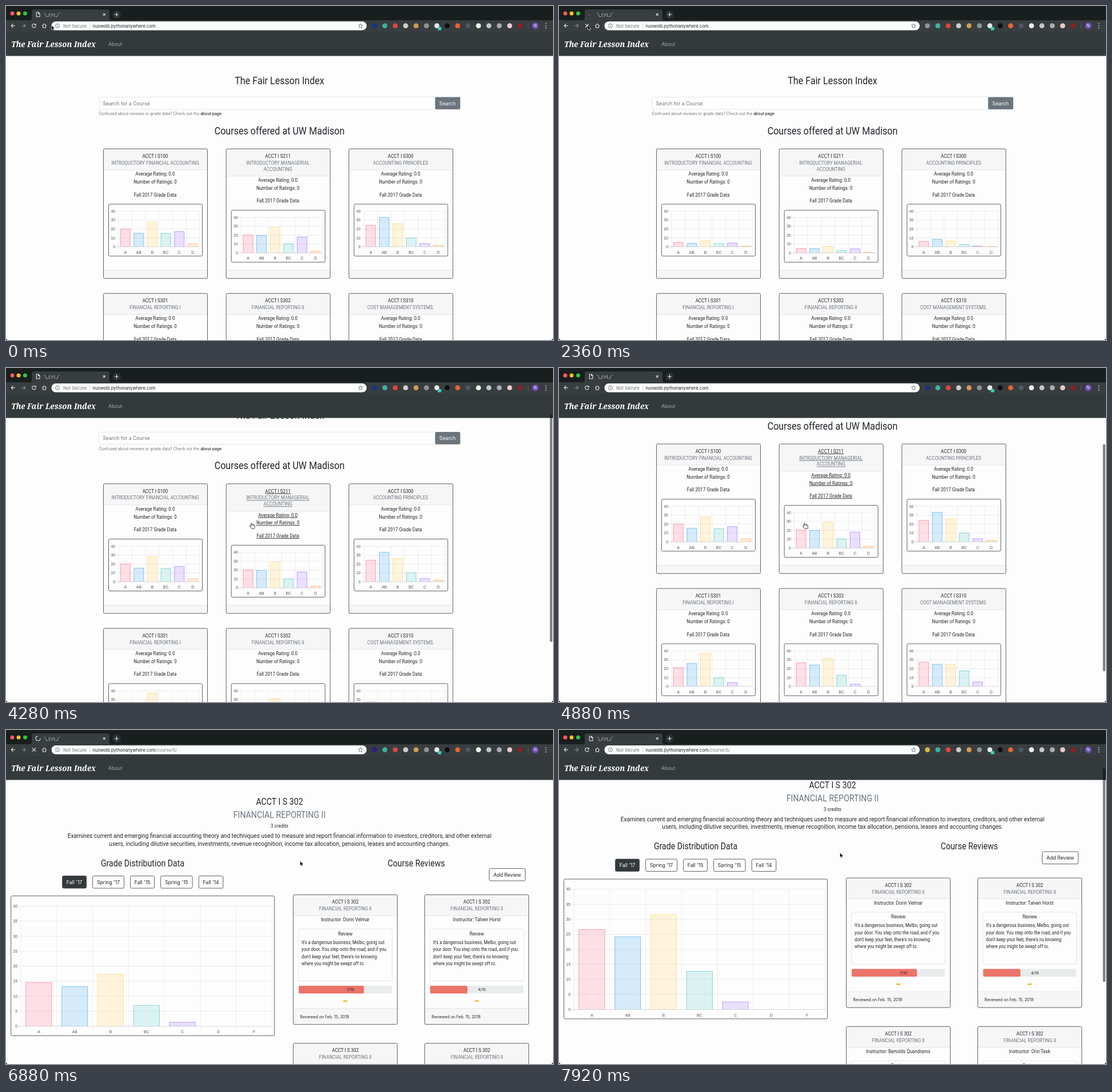
Write an HTML page that moves like this. It is 957x585 px and loops after 8000 ms.

```html
<!DOCTYPE html>
<html lang="en">
<head>
<meta charset="utf-8">
<title>Course guide</title>
<style>
  html, body { margin: 0; width: 100%; height: 100%; overflow: hidden; background: #fdfdfe; }
  svg { display: block; width: 100%; height: 100%; cursor: default; }
  text { font-family: Inter, 'Noto Sans CJK JP', 'Noto Sans', sans-serif; fill: #212529; white-space: pre; }
  .cond { font-family: Roboto, sans-serif; }
  .axis { font-family: 'Liberation Sans', sans-serif; font-size: 6.8px; fill: #555; }
  .brand { font-family: 'Noto Serif', serif; font-weight: 700; font-style: italic; fill: #fff; }
  .muted { fill: #6c757d; }
  .hover .link { text-decoration: underline; }
  .box { fill: none; stroke: #343a3c; stroke-width: .8; }
  .soft { fill: none; stroke: #d9dcdf; stroke-width: .7; }
  .band { fill: #f6f6f7; }
  .grid { fill: none; stroke: #000; stroke-opacity: .11; stroke-width: .6; }
  .zero { fill: none; stroke: #000; stroke-opacity: .25; stroke-width: .6; }
  .bars path { fill-opacity: .2; stroke-opacity: .85; stroke-width: .7; vector-effect: non-scaling-stroke; }
  .icon { fill: none; stroke: #e8eaeb; stroke-width: 1.1; }
</style>
</head>
<body>
<svg viewBox="0 0 957 585" xmlns="http://www.w3.org/2000/svg">
  <rect width="957" height="585" fill="#fdfdfe"/>
  <g id="home"></g>
  <g id="course"></g>

  <rect y="45" width="957" height="42.5" fill="#343a3c"/>
  <text class="brand" transform="translate(9 72) scale(.885 1)" font-size="15">The Fair Lesson Index</text>
  <text x="179" y="70" font-size="8.7" style="fill:#a3a7a9">About</text>

  <rect width="957" height="26" fill="#191e1e"/>
  <rect y="25" width="957" height="20" fill="#383d3f"/>
  <path d="M41 25.5Q45 25 45 21V10Q45 6 49 6H177Q181 6 181 10V21Q181 25 185 25.5Z" fill="#383d3f"/>
  <circle cx="11" cy="13" r="3.5" fill="#fb5d57"/>
  <circle cx="22" cy="13" r="3.5" fill="#fcbc2f"/>
  <circle cx="33.5" cy="13" r="3.5" fill="#2bc840"/>
  <path id="favicon" class="icon" d="M53.3 11h3.5l2.2 2.2v5.6h-5.7zM56.6 11v2.4h2.4" stroke-width=".9"/>
  <path id="spinner" class="icon"/>
  <text x="65" y="17.5" font-size="7" style="fill:#f2f3f3">¯\_(ツ)_/¯</text>
  <path class="icon" d="M169.8 12.8l4 4m0-4l-4 4"/>
  <circle cx="193.5" cy="15" r="7.5" fill="#2a3030"/>
  <path class="icon" d="M190 15h7M193.5 11.5v7"/>
  <path class="icon" d="M16 34.5H9.3M12.5 31.2L9.2 34.5l3.3 3.3"/>
  <path class="icon" d="M27 34.5h6.7M30.5 31.2l3.3 3.3-3.3 3.3" stroke-opacity=".45"/>
  <g id="reload"><path class="icon" d="M51.6 32.5a3.3 3.3 0 1 0 .6 2.8"/><path d="M52.6 30.8v3.3h-3.3z" fill="#e8eaeb"/></g>
  <path id="stop" class="icon" d="M45.9 31.4l6.2 6.2m0-6.2l-6.2 6.2"/>
  <path class="icon" d="M63.3 34.6L67 31.2l3.7 3.4M64.6 34.2v3.8h4.8v-3.8"/>
  <rect x="79.5" y="27" width="551.5" height="15.6" rx="7.8" fill="#fcfdfd"/>
  <circle cx="90" cy="34.7" r="3.5" fill="none" stroke="#5f6568" stroke-width=".8"/>
  <path d="M90 34.2v2.4M90 32.5v.9" stroke="#5f6568" stroke-width=".9"/>
  <text x="100" y="37.5" font-size="7.7" style="fill:#6b7073">Not Secure</text>
  <path d="M146.5 30v9.5" stroke="#c8cbcd" stroke-width=".7"/>
  <text x="151.5" y="37.5" font-size="7.6">nuswolb.pythonanywhere.com<tspan id="path" fill="#777c80">/course/5/</tspan></text>
  <path d="M620.3 30.8l1.1 2.6 2.8.2-2.1 1.8.6 2.8-2.4-1.5-2.4 1.5.6-2.8-2.1-1.8 2.8-.2z" fill="none" stroke="#5f6568" stroke-width=".8"/>
  <g id="extensions"></g>
  <path d="M913.5 30v9.5" stroke="#6a6f72" stroke-width=".7"/>
  <circle cx="926" cy="34.7" r="6" fill="#6a4bb0"/>
  <text x="926" y="37.3" font-size="7" text-anchor="middle" style="fill:#fff">N</text>
  <path d="M944.5 30.8v.01M944.5 34.6v.01M944.5 38.4v.01" stroke="#e8eaeb" stroke-width="1.8" stroke-linecap="round"/>

  <rect id="thumb" x="951.6" width="4.2" rx="2.1" fill="#000" fill-opacity=".5"/>
  <path d="M0 581v4h4Q0 585 0 581M957 581v4h-4Q957 585 957 581"/>
  <path id="arrow" d="M0 0V8.2L1.9 6.5 3.2 9.3 4.6 8.7 3.4 6H6Z" fill="#000" stroke="#fff" stroke-width=".6"/>
  <path id="hand" d="M0 .8Q.9-.4 1.8.8V3.6Q3.3 2.8 3.7 4 5-.2 5.4 4.4 7 3.8 7 5.4V7Q6.8 8.6 6 9.8H1.4Q-.8 7.4-2.2 5.6-2.2 4.4 0 5.6Z" fill="#fff" stroke="#111" stroke-width=".8"/>
</svg>

<script>
const LOOP = 8000;
const CONDENSED = 0.885;
const LABELS = ['A', 'AB', 'B', 'BC', 'C', 'D', 'F'];
const COLORS = ['#ff6384', '#36a2eb', '#ffce56', '#4bc0c0', '#9966ff', '#ff9f40', '#ff6384'];
const $ = id => document.getElementById(id);

// Drawing helpers: each returns SVG markup
const rect = (x, y, w, h, attrs) => `<rect x="${x}" y="${y}" width="${w}" height="${h}" ${attrs}/>`;
const line = (d, cls) => `<path class="${cls}" d="${d}"/>`;
const text = (x, y, size, str, attrs = '') => `<text x="${x}" y="${y}" font-size="${size}" ${attrs}>${str}</text>`;
const cond = (x, y, size, str, cls = '', anchor = 'middle') =>
  `<text class="cond ${cls}" transform="translate(${x} ${y}) scale(${CONDENSED} 1)" font-size="${size}" text-anchor="${anchor}">${str}</text>`;

function chart(x0, y0, unit, cat, tick, data) {
  const right = x0 + cat * data.length, barW = cat * 0.72;
  let grid = '', out = '', bars = '';
  for (let v = 0; v <= 40; v += tick) {
    const y = y0 - v * unit;
    if (v) grid += `M${x0 - 5} ${y}H${right}`;
    out += text(x0 - 6, y + 2.4, 6.8, v, 'class="axis" text-anchor="end"');
  }
  for (let i = 0; i <= data.length; i++) grid += `M${x0 + i * cat} ${y0 - 40 * unit}V${y0 + 5}`;
  data.forEach((v, i) => {
    const mid = x0 + (i + 0.5) * cat;
    out += text(mid, y0 + 12, 6.8, LABELS[i], 'class="axis" text-anchor="middle"');
    if (v) bars += `<path d="M${mid - barW / 2} 0V${-v * unit}h${barW}V0" fill="${COLORS[i]}" stroke="${COLORS[i]}"/>`;
  });
  return line(grid, 'grid') + line(`M${x0 - 5} ${y0}H${right}`, 'zero') + out +
    `<g class="bars" data-y="${y0}">${bars}</g>`;
}

function frame(headH, footY) {
  return rect(0, 0, 182, headH, 'class="band"') + rect(0, footY, 182, 227 - footY, 'class="band"') +
    line(`M0 ${headH}H182M0 ${footY}H182`, 'soft') + rect(0, 0, 182, 227, 'rx="2.3" class="box"');
}

const CARDS = [
  ['S100', ['INTRODUCTORY FINANCIAL ACCOUNTING'], [20, 15.3, 28, 15, 17.2, 3.2]],
  ['S211', ['INTRODUCTORY MANAGERIAL', 'ACCOUNTING'], [20.2, 19.8, 29, 10.3, 18, 2]],
  ['S300', ['ACCOUNTING PRINCIPLES'], [24.2, 33.2, 26, 10, 3.6, 1.7]],
  ['S301', ['FINANCIAL REPORTING I'], [21.2, 25.8, 37.3, 9.8, 4.4, 0]],
  ['S302', ['FINANCIAL REPORTING II'], [26.6, 24.2, 31.6, 12.7, 2.5, 0]],
  ['S310', ['COST MANAGEMENT SYSTEMS.'], [27.5, 25, 25, 17.6, 5.1, 0]],
].map(([code, title, grades], i) => ({
  code, title, grades, x: 170.5 + 214.7 * (i % 3), y: 250.2 + 253.2 * Math.floor(i / 3),
}));

function courseCard({ code, title, grades, x, y }) {
  const dy = (title.length - 1) * 10.8, mid = 90.5;
  return `<g class="card" transform="translate(${x} ${y})">` + frame(37 + dy, 212.5) +
    cond(mid, 15.8, 9.1, 'ACCT I ' + code, 'link') +
    title.map((s, i) => cond(mid, 27.6 + i * 10.8, 9.1, s, 'link muted')).join('') +
    ['Average Rating: 0.0', 'Number of Ratings: 0', 'Fall 2017 Grade Data']
      .map((s, i) => cond(mid, [47, 60.7, 83.3][i] + dy, 9.1, s, 'link')).join('') +
    rect(9, 96.8 + dy, 164, 91, 'rx="2.3" class="box"') +
    chart(26.5, 171.5 + dy, 1.553, 23.6, 10, grades) + '</g>';
}

const QUOTE = ['It\'s a dangerous business, Melbo, going out', 'your door. You step onto the road, and if you',
  'don\'t keep your feet, there\'s no knowing', 'where you might be swept off to.'];

function reviewCard([name, score], i) {
  const mid = 91;
  return `<g transform="translate(${502.6 + 230 * (i % 2)} ${288.6 + 260.2 * Math.floor(i / 2)})">` + frame(36.5, 199) +
    cond(mid, 15.5, 9.1, 'ACCT I S 302') + cond(mid, 27.5, 9.1, 'FINANCIAL REPORTING II', 'muted') +
    cond(mid, 46.8, 9.1, 'Instructor: ' + name) +
    rect(9, 60, 164, 91, 'rx="2" class="soft"') + cond(mid, 71.2, 9.1, 'Review') +
    QUOTE.map((s, j) => cond(14.5, 86 + 12.45 * j, 8.6, s, '', 'start')).join('') +
    rect(9.5, 159.5, 163, 13.5, 'rx="2" fill="#e9ecec"') +
    rect(9.5, 159.5, 16.3 * score, 13.5, 'rx="2" fill="#ec7368"') +
    text(100, 168.8, 6.8, score + '/10', 'text-anchor="middle"') +
    rect(87, 184.7, 8, 3, 'rx="1.5" fill="#f2c144"') +
    text(12, 216.2, 6.9, 'Reviewed on Feb. 15, 2018') + '</g>';
}

const button = (x, y, w, label, on) =>
  rect(x, y, w, 21.5, `rx="2.3" class="box" ${on ? 'style="fill:#343a3c"' : ''}`) +
  text(x + w / 2, y + 13.9, 8.7, label, `text-anchor="middle" ${on ? 'style="fill:#fff"' : ''}`);

$('home').innerHTML =
  cond(478.5, 136.6, 18.2, 'The Fair Lesson Index') +
  rect(162.5, 159.6, 589, 21.4, 'rx="2" class="soft"') +
  text(169.5, 173.5, 8.7, 'Search for a Course', 'class="muted"') +
  rect(750.7, 159.4, 44, 21.7, 'rx="2" fill="#6c757d"') +
  text(772.5, 173.5, 8.7, 'Search', 'text-anchor="middle" style="fill:#fff"') +
  text(162.3, 191.2, 6.9, 'Confused about reviews or grade data? Check out the <tspan fill="#000">about page</tspan>', 'class="muted"') +
  cond(478.5, 224.8, 18.2, 'Courses offered at UW Madison') +
  CARDS.map(courseCard).join('') +
  line('M432.5 762V740H523.5V762M451.5 740v22M470.5 740v22M490.5 740v22', 'soft');

$('course').innerHTML =
  cond(478.5, 131.2, 16, 'ACCT I S 302') + cond(478.5, 154.3, 16, 'FINANCIAL REPORTING II', 'muted') +
  cond(478.5, 171.4, 9.1, '3 credits') +
  cond(478.5, 189, 11.4, 'Examines current and emerging financial accounting theory and techniques used to measure and report financial information to investors, creditors, and other external') +
  cond(478.5, 202.7, 11.4, 'users, including dilutive securities, investments, revenue recognition, income tax allocation, pensions, leases and accounting changes.') +
  cond(239, 238.6, 16, 'Grade Distribution Data') + cond(717.8, 238.6, 16, 'Course Reviews') +
  button(98.6, 255.6, 42, 'Fall \'17', true) + button(151.6, 255.6, 55, 'Spring \'17') +
  button(217.6, 255.6, 42, 'Fall \'15') + button(270.6, 255.6, 55.5, 'Spring \'15') +
  button(337.3, 255.6, 42.5, 'Fall \'14') + button(845.4, 242.6, 63, 'Add Review') +
  rect(8.6, 290.6, 461, 244.8, 'rx="2.3" class="box"') +
  chart(26, 519, 5.2625, 62.8, 5, [...CARDS[4].grades, 0]) +
  [['Dorin Velmar', 7], ['Talven Horst', 4], ['Bertolds Quandrams', 6], ['Orin Tesk', 5]].map(reviewCard).join('');

$('extensions').innerHTML =
  ['#1d2f86', '#3db39e', '#d8483c', '#c9d0cc', '#d59a52', '#8d9396', '#e6e8e8', '#0d0f10', '#e8642f',
    '#4d5964', '#f0f1f1', '#c3c7c9', '#a9adaf', '#e9c9cc', '#8c1f22']
    .map((c, i) => `<circle cx="${644.6 + 18.2 * i}" cy="34.7" r="4.4" fill="${c}"/>`).join('') +
  rect(755.5, 37, 6, 5.5, 'rx="1" fill="#36d6c0"');

// Motion
const clamp = v => Math.min(1, Math.max(0, v));
const smooth = v => v * v * (3 - 2 * v);
const grow = p => 1 - (1 - clamp(p)) ** 4;
const between = (t, a, b) => t >= a && t < b;

// Keys are [time, ...values]; movement eases in and out between them
function track(keys, t) {
  const next = keys.findIndex(k => k[0] > t);
  if (next < 0) return keys[keys.length - 1].slice(1);
  if (!next) return keys[0].slice(1);
  const a = keys[next - 1], b = keys[next], k = smooth((t - a[0]) / (b[0] - a[0]));
  return a.slice(1).map((v, i) => v + (b[i + 1] - v) * k);
}

const POINTER = [[300, 79.5, 33.5], [1100, 50, 33.5], [2500, 50, 33.5], [3700, 428.5, 271.5], [4900, 428.5, 271.5],
  [5800, 476.5, 349], [6200, 476.5, 349], [6880, 514.5, 229.5], [7000, 514.5, 229.5], [7500, 491.5, 215]];
const HOME_SCROLL = [[3900, 0], [4680, 117.2], [4880, 117.2], [5500, 159.7]];
const COURSE_SCROLL = [[7450, 0], [7920, 29.5]];
const LOADS = [{ click: 1400, commit: 2290, done: 2900 }, { click: 6050, commit: 6700, done: 7250 }];

const STEPS = [[200, 1120, 6], [1320, 2360, 6], [2560, 3440, 5], [3640, 4680, 6], [4880, 5760, 5], [5960, 6880, 5], [7080, 7920, 5]]
  .flatMap(([a, b, n]) => Array.from({ length: n }, (_, i) => Math.floor((a + (b - a) * i / (n - 1)) / 40) * 40));

const cards = [...document.querySelectorAll('.card')];
const barsOf = id => [...$(id).querySelectorAll('.bars')];
const homeBars = barsOf('home'), courseBars = barsOf('course');
const show = (id, on) => { $(id).style.display = on ? '' : 'none'; };
const move = (id, x, y) => $(id).setAttribute('transform', `translate(${x} ${y})`);
const scaleBars = (list, k) => list.forEach(g =>
  g.setAttribute('transform', `translate(0 ${g.dataset.y}) scale(1 ${Math.max(k, 0.001)})`));

function drawSpinner(t, load) {
  const k = clamp((t - load.commit - 70) / 110), waiting = t < load.commit;
  const start = waiting ? 190 : 165 - 165 * k + Math.max(0, t - load.commit - 180) * 0.5;
  const sweep = waiting ? 65 : 15 + 245 * k;
  const at = deg => `${56 + 4 * Math.cos(deg * Math.PI / 180)} ${14.8 + 4 * Math.sin(deg * Math.PI / 180)}`;
  $('spinner').setAttribute('d', `M${at(start)}A4 4 0 ${sweep > 180 ? 1 : 0} 1 ${at(start + sweep)}`);
}

function render(t) {
  const onCourse = t >= LOADS[1].commit;
  const [scroll] = track(onCourse ? COURSE_SCROLL : HOME_SCROLL, t);
  const [px, py] = track(POINTER, t);
  const load = LOADS.find(l => between(t, l.click, l.done));

  show('home', !onCourse);
  show('course', onCourse);
  show('path', onCourse);
  move(onCourse ? 'course' : 'home', 0, -scroll);
  scaleBars(homeBars, t < LOADS[0].commit ? 1 : grow((t - LOADS[0].commit) / 1000));
  scaleBars(courseBars, grow((t - LOADS[1].commit) / 1000));

  let hand = false;
  CARDS.forEach((c, i) => {
    const over = !onCourse && py > 87 && between(px, c.x, c.x + 182) && between(py + scroll, c.y, c.y + 227);
    cards[i].classList.toggle('hover', over);
    hand = hand || over;
  });
  show('arrow', !hand);
  show('hand', hand);
  move(hand ? 'hand' : 'arrow', px, py);

  show('favicon', !load);
  show('spinner', load);
  show('reload', !load);
  show('stop', load);
  if (load) drawSpinner(t, load);
  $('extensions').firstChild.setAttribute('fill',
    onCourse ? (load ? '#2a1c8c' : '#d9b441') : between(t, LOADS[0].commit, LOADS[0].done) ? '#8f9499' : '#1d2f86');

  const pageH = onCourse ? 780 : 733, view = 540;
  show('thumb', between(t, 3950, 5750) || t > 7480);
  $('thumb').setAttribute('y', 47 + scroll * view / pageH);
  $('thumb').setAttribute('height', view * view / pageH);
}

function tick() {
  const now = performance.now() % LOOP;
  render(STEPS.reduce((held, s) => (s <= now ? s : held), 0));
  requestAnimationFrame(tick);
}
tick();
</script>
</body>
</html>
```
